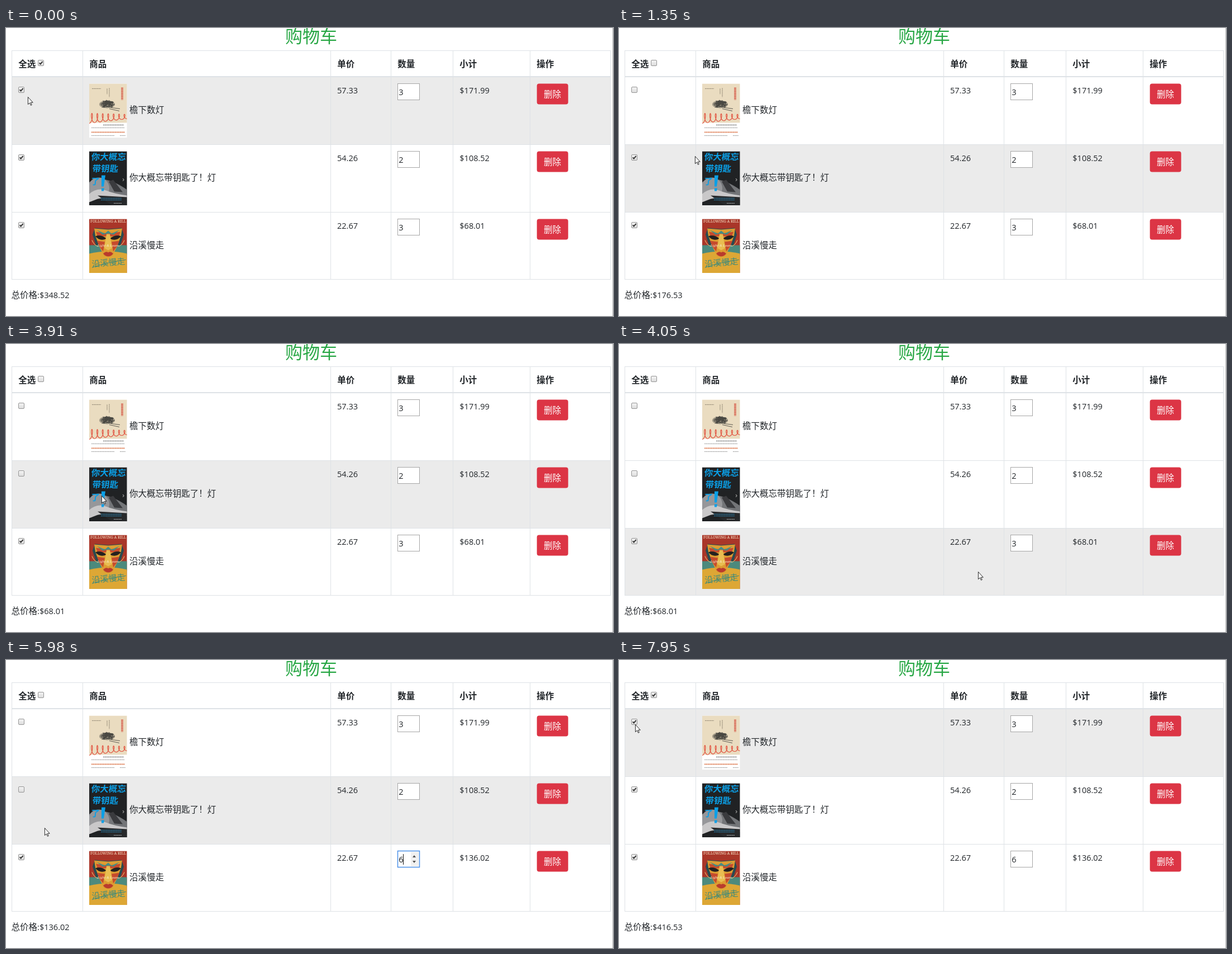
Write an HTML page that moves like this. It is 1087 by 515 pixels and loops after 8000 ms.

```html
<!DOCTYPE html>
<html lang="zh-CN">
<head>
<meta charset="utf-8">
<title>购物车</title>
<style>
  html, body { margin: 0; width: 100%; height: 100%; overflow: hidden; background: #fff; }
  svg { display: block; }
  text { font: 15.5px "Noto Sans CJK SC", "Noto Sans CJK", sans-serif; fill: #212529; }
  .num { font: 14.5px "Open Sans", "Noto Sans", sans-serif; }
  .title { font-size: 31px; fill: #28a745; }
  .head { font-weight: 700; }
  .lines { fill: #dee2e6; shape-rendering: crispEdges; }
  .hover { fill: #ebebeb; shape-rendering: crispEdges; }
  .button { fill: #dc3545; }
  .button + text { fill: #fff; }
  .input { fill: #fff; stroke: #a6a6a6; }
  .input.focus { stroke: #4a90e8; stroke-width: 1.5; }
  .box { fill: url(#boxFill); stroke: #959595; }
  .tick { fill: none; stroke: #333; stroke-width: 2; }
  .print { stroke-dasharray: 2.4 .6; }
  .sketch { fill: none; stroke: #494842; stroke-width: .9; }
  .scribble { fill: none; stroke: #e2523f; stroke-width: 1.2; }
  .brush { font-size: 15.5px; font-weight: 700; fill: #0b9fe6; }
  .script { font-size: 15px; fill: #3d8a7c; }
  .banner { font: 6.6px "Noto Serif", serif; fill: #fbeed2; }
  .tiny { font: italic 6px "Noto Serif", serif; fill: #fbeed2; }
</style>
</head>
<body>
<svg width="1087" height="515" viewBox="0 0 1087 515">
  <defs>
    <linearGradient id="boxFill" x2="0" y2="1">
      <stop stop-color="#f4f4f4"/><stop offset="1" stop-color="#dcdcdc"/>
    </linearGradient>
    <clipPath id="page"><rect width="67.5" height="96.5"/></clipPath>

    <g id="cover0" clip-path="url(#page)">
      <rect width="68" height="97" fill="#fff"/>
      <rect width="68" height="70" fill="#eadcc0"/>
      <path class="print" stroke="#d9705c" stroke-width="4" d="M59 7V29"/>
      <path class="print" stroke="#8d8371" d="M5 9H21M36 8V24M32 9V19"/>
      <ellipse cx="32" cy="37" rx="14" ry="7" fill="#a39b88"/>
      <path class="sketch" id="sketch"/>
      <path class="sketch" d="M36 45L54 49M39 43L55 45"/>
      <path class="scribble" id="scribble"/>
      <path class="print" stroke="#555" d="M25 74H62"/>
      <path class="print" stroke="#999" d="M4 79H63M4 93H45M55 93H65"/>
      <path class="print" stroke="#dd7a4f" stroke-width="1.8" d="M4 87H64"/>
    </g>

    <g id="cover1" clip-path="url(#page)">
      <rect width="68" height="97" fill="#202224"/>
      <path fill="#737578" d="M0 55Q26 40 68 69V80H0Z"/>
      <circle cx="17" cy="66" r="19" fill="#96979a"/>
      <path fill="#c9c8c9" d="M0 76Q15 64 30 70T68 79V87L23 82L0 91Z"/>
      <path fill="#3a3b3e" d="M35 54L43 51L60 73L45 72Z"/>
      <path fill="#27292b" d="M15 79L68 82V97H41Z"/>
      <path fill="none" stroke="#deddd9" d="M60 49Q64 51 60 53"/>
      <g transform="skewX(-6)">
        <text class="brush" x="5" y="16">你大概忘</text>
        <text class="brush" x="9" y="37">带钥匙</text>
        <text class="brush" x="9" y="60">了</text>
      </g>
      <path fill="#0b9fe6" d="M22 43H29L26 63H22ZM22 66H27L26 71H22Z"/>
      <path class="print" stroke="#298bbd" d="M21 84H58M21 87H58"/>
      <path class="print" stroke="#aaa" d="M44 93H58"/>
    </g>

    <g id="halfMask">
      <path fill="#294b50" d="M6 28L10 16L34 18V47H12Z"/>
      <path fill="#dd9c32" d="M9 17L34 19V67H27L18 49L11 30Z"/>
      <path fill="#c64b2d" d="M12 23L34 26V31H15ZM14 39L28 41L25 58L18 49Z"/>
      <path fill="#438d86" d="M14 20L28 26L34 21V26L24 28Z"/>
      <path fill="#25211f" d="M11 31Q20 27 31 35Q20 41 11 31Z"/>
      <path fill="#e9bd51" d="M31 27H34V56L27 52Z"/>
      <path fill="#b93b2d" d="M25 62Q30 57 34 60V67Q29 67 25 62Z"/>
      <path fill="none" stroke="#f1d175" d="M5 38Q8 46 15 49"/>
    </g>
    <g id="cover2" clip-path="url(#page)">
      <rect width="68" height="97" fill="#a93629"/>
      <rect y="47" width="68" height="17" fill="#4c8a7d"/>
      <path fill="#dda735" d="M0 62Q34 54 68 62V97H0Z"/>
      <use href="#halfMask"/>
      <use href="#halfMask" transform="matrix(-1 0 0 1 68 0)"/>
      <text class="banner" x="34" y="7" text-anchor="middle">FOLLOWING A RILL</text>
      <text class="tiny" x="34" y="50" text-anchor="middle">Light &amp; Loam</text>
      <text class="script" x="5" y="86" transform="rotate(-5 5 86)">沿溪慢走</text>
      <path fill="none" stroke="#3d8a7c" d="M5 87Q25 79 66 73"/>
    </g>
  </defs>

  <text class="title" x="500" y="26.2">购物车</text>
  <g id="table"></g>
  <text x="9.6" y="483">总价格<tspan class="num" id="total"></tspan></text>
  <rect x="1086" width="1" height="515" fill="#bdbdbd"/>
  <path id="cursor" fill="#fff" stroke="#111" stroke-width=".9" d="M.4 .5V13.6L3.4 10.9L5.4 15.3L7.2 14.5L5.2 10.2H9.2Z"/>
</svg>

<script>
const LOOP = 8000;
const STEP = 145;      // the screen refreshes at this pace
const PITCH = 121;
const FIRST_ROW = 88;
const TABLE_END = 449;
const columns = [10, 137, 581, 689, 800, 938, 1082];
const headings = ["全选", "商品", "单价", "数量", "小计", "操作"];
const rows = [
  { name: "檐下数灯", price: 57.33, count: 3 },
  { name: "你大概忘带钥匙了！灯", price: 54.26, count: 2 },
  { name: "沿溪慢走", price: 22.67, count: 3 },
];

// Pointer glides, each from wherever the last one ended.
const home = { x: 39, y: 123 };
const glides = [
  { from: 150, to: 300, x: 29, y: 112 },
  { from: 1080, to: 1350, x: 136, y: 229 },
  { from: 1490, to: 1950, x: 85, y: 242 },
  { from: 2070, to: 2790, x: 30, y: 233 },
  { from: 3910, to: 3910, x: 171, y: 271 },
  { from: 4050, to: 4050, x: 643, y: 407 },
  { from: 4170, to: 4890, x: 731, y: 349 },
  { from: 5550, to: 5830, x: 87, y: 331 },
  { from: 5980, to: 6700, x: 28, y: 230 },
  { from: 6980, to: 6980, x: 28, y: 211 },
  { from: 7130, to: 7550, x: 28, y: 112 },
  { from: 7950, to: 7950, x: 29, y: 115 },
];
const spinStart = 5140, blurAt = 6420;

const byId = id => document.getElementById(id);
const money = value => "$" + value.toFixed(2);
const show = (id, on) => byId(id).setAttribute("visibility", on ? "visible" : "hidden");
const easeOut = p => 1 - (1 - p) ** 2;
const rowTop = i => FIRST_ROW + PITCH * i;
const rowHeight = i => Math.min(PITCH - 1, TABLE_END - rowTop(i));

function stepsDone(t, from, to) {
  const steps = Math.round((to - from) / STEP) + 1;
  const done = Math.floor((t - from) / STEP + 0.15) + 1;
  return [Math.max(0, Math.min(steps, done)), steps];
}

function pointerAt(t) {
  let { x, y } = home;
  for (const glide of glides) {
    if (t < glide.from) break;
    const [done, steps] = stepsDone(t, glide.from, glide.to);
    const p = easeOut(done / steps);
    x += (glide.x - x) * p;
    y += (glide.y - y) * p;
  }
  return { x, y };
}

function drawCoverArt() {
  let seed = 7;
  const random = () => (seed = seed * 16807 % 2147483647) / 2147483647;
  const polyline = (n, point) => "M" + Array.from({ length: n }, (_, i) => point(i / (n - 1))).join("L");
  byId("sketch").setAttribute("d", polyline(60, () => {
    const angle = random() * Math.PI * 2, r = Math.sqrt(random());
    return `${32 + 14 * r * Math.cos(angle)} ${37 + 8 * r * Math.sin(angle)}`;
  }));
  byId("scribble").setAttribute("d", polyline(150, u => {
    const angle = u * Math.PI * 14;
    return `${68 * u + 3 * Math.sin(angle)} ${62 - 3 * u + (9 - 5 * u) * Math.cos(angle)}`;
  }));
}

const checkbox = (id, x, y) => `<g transform="translate(${x} ${y})">
  <rect class="box" x=".5" y=".5" width="10" height="10" rx="1.5"/>
  <path class="tick" id="${id}" d="M2.6 5.4L4.6 7.6L8.6 2.9"/></g>`;

const rowMarkup = ({ name, price }, i) => `<g transform="translate(0 ${rowTop(i)})">
  <rect class="hover" id="hover${i}" x="11" width="1071" height="${rowHeight(i)}"/>
  ${checkbox("tick" + i, 22, 17)}
  <use href="#cover${i}" x="149" y="11.4"/>
  <text x="221" y="64.2">${name}</text>
  <text class="num" x="593" y="29">${price}</text>
  <rect class="input" id="input${i}" x="701.5" y="11.5" width="39" height="29"/>
  <text class="num" id="qty${i}" x="703.3" y="32"></text>
  <text class="num" id="sum${i}" x="812.3" y="29"></text>
  <rect class="button" x="950.7" y="11.4" width="56" height="37.2" rx="4"/>
  <text x="963" y="36.3">删除</text></g>`;

function buildTable() {
  const heads = headings.map((label, i) =>
    `<text class="head" x="${columns[i] + 12.3}" y="69.7">${label}</text>`).join("");
  const rules = columns.map(x => `M${x} 40h1v410h-1z`).join("") +
    [40, 208, 329, TABLE_END].map(y => `M10 ${y}h1073v1h-1073z`).join("") + "M10 86h1073v2h-1073z";
  byId("table").innerHTML = heads + checkbox("tickAll", 57, 57) + rows.map(rowMarkup).join("") +
    `<path class="lines" d="${rules}"/>
    <g id="spinner"><rect x="725" y="343" width="14" height="26" fill="#f0f0f0"/>
      <path fill="#505050" d="M728 353L731 349L734 353ZM728 359L731 363L734 359Z"/></g>
    <rect id="caret" x="711" y="347" width="1" height="19" fill="#111"/>`;
}

function render(t) {
  const { x, y } = pointerAt(t);
  const checked = [t < 930 || t >= 7830, t < 3060 || t >= 6560, true];
  const added = [0, 0, stepsDone(t, spinStart, spinStart + 2 * STEP)[0]];
  const focused = t >= spinStart && t < blurAt;
  const overInput = x > 701 && x < 741 && y > 341 && y < 371;
  let total = 0;

  rows.forEach(({ price, count }, i) => {
    const quantity = count + added[i];
    if (checked[i]) total += price * quantity;
    show("hover" + i, Math.floor((y - FIRST_ROW + 1) / PITCH) === i);
    show("tick" + i, checked[i]);
    byId("qty" + i).textContent = quantity;
    byId("sum" + i).textContent = money(price * quantity);
  });
  show("tickAll", checked.every(Boolean));
  show("spinner", focused || overInput);
  show("caret", focused);
  byId("input2").classList.toggle("focus", focused);
  byId("total").textContent = ":" + money(total);
  byId("cursor").setAttribute("transform", `translate(${Math.round(x)} ${Math.round(y)})`);
}

drawCoverArt();
buildTable();
const start = performance.now();
function tick() {
  render((performance.now() - start) % LOOP);
  requestAnimationFrame(tick);
}
tick();
</script>
</body>
</html>
```
